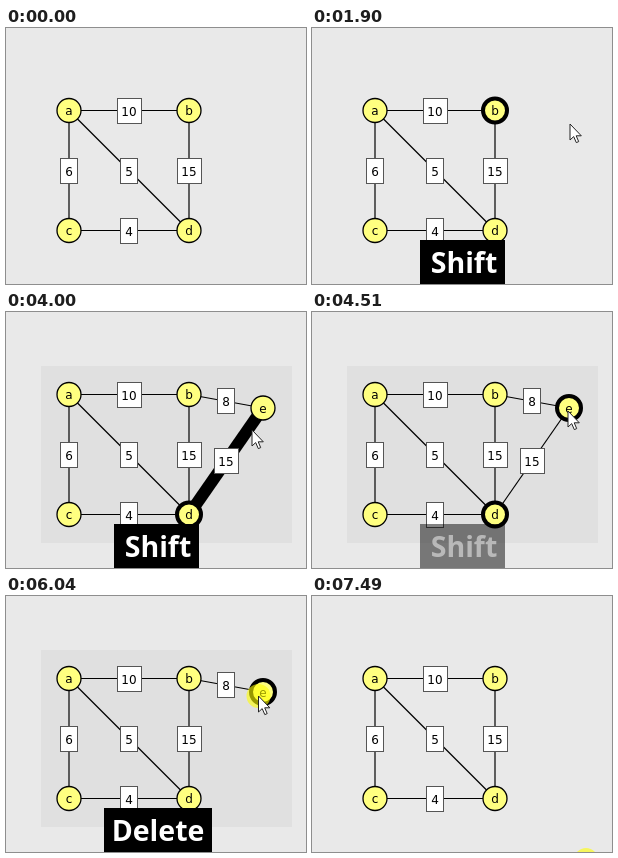
An HTML page with a canvas that plays this animation: 300 by 256 pixels, repeating every 7530 ms.

```html
<!DOCTYPE html>
<html lang="en">
<head>
<meta charset="utf-8">
<title>Graph editor</title>
<style>
  html, body { margin: 0; width: 100%; height: 100%; overflow: hidden; background: #e9e9e9; }
  canvas { display: block; }
</style>
</head>
<body>
<canvas id="stage" width="300" height="256"></canvas>
<script>
const ctx = document.getElementById('stage').getContext('2d');
const LOOP = 7530;

const nodes = { a: [63, 82.5], b: [183, 82.5], c: [63, 202.5], d: [183, 202.5], e: [257, 96] };
const edges = ['ab10', 'ac6', 'ad5', 'cd4', 'bd15', 'be8', 'de15'];

// Lifetimes, and the spans in which a part is highlighted, in ms
const alive = { e: [2040, 6370], be: [2040, 6370], de: [3300, 5390] };
const bold = {
  b: [[360, 2040]],
  d: [[2840, 4560]],
  e: [[2040, 3300], [4190, 4760], [5900, 6370]],
  de: [[3710, 4190], [4760, 5390]]
};

// Pointer stops: time, x, y
const path = [
  [40, 241, 201], [460, 187, 77], [1350, 187, 77], [1760, 258, 96],
  [2320, 258, 96], [2930, 187, 205], [3060, 184, 197], [3630, 184, 197],
  [4000, 246, 118], [4280, 256, 99], [4700, 256, 99], [5030, 240, 125],
  [5720, 240, 125], [6000, 252.5, 100], [7170, 252.5, 100], [7300, 266, 262]
];

// Clicks: start, end, and the place if it is not at the pointer
const clicks = [[690, 730], [1990, 2040], [5200, 5240], [6040, 6130], [7490, LOOP, 274, 264]];

// Key captions: text, start, end, left, width
const keys = [['Shift', 1680, 4460, 108, 85], ['Delete', 5340, 7170, 98, 108]];

const within = (t, [from, to]) => t >= from && t < to;
const exists = (id, t) => !alive[id] || within(t, alive[id]);
const isBold = (id, t) => (bold[id] || []).some(span => within(t, span));

function pointer(t) {
  const i = path.findIndex(p => p[0] > t);
  if (i < 1) return null;
  const [t0, x0, y0] = path[i - 1], [t1, x1, y1] = path[i];
  const u = (t - t0) / (t1 - t0), k = u * u * (3 - 2 * u);
  return [x0 + (x1 - x0) * k, y0 + (y1 - y0) * k];
}

function text(s, x, y, font, color) {
  ctx.font = font;
  ctx.fillStyle = color;
  ctx.textAlign = 'center';
  ctx.fillText(s, x, y);
}

const small = '12px "DejaVu Sans", sans-serif';

function drawEdge(edge, t) {
  const id = edge.slice(0, 2), weight = edge.slice(2);
  if (!exists(id, t)) return;
  const [x0, y0] = nodes[id[0]], [x1, y1] = nodes[id[1]];
  ctx.beginPath();
  ctx.moveTo(x0, y0);
  ctx.lineTo(x1, y1);
  ctx.strokeStyle = '#000';
  ctx.lineWidth = isBold(id, t) ? 12 : 1.2;
  ctx.stroke();

  const x = (x0 + x1) / 2, y = (y0 + y1) / 2, w = weight.length > 1 ? 24 : 17;
  const box = [Math.floor(x - w / 2) + 0.5, Math.floor(y - 12.5) + 0.5, w, 25];
  ctx.fillStyle = '#fff';
  ctx.fillRect(...box);
  ctx.strokeStyle = '#555';
  ctx.lineWidth = 1;
  ctx.strokeRect(...box);
  text(weight, x, Math.round(y + 5), small, '#000');
}

function drawNode(id, t) {
  if (!exists(id, t)) return;
  const [x, y] = nodes[id];
  disc(x, y, '#ffff80');
  ctx.strokeStyle = '#000';
  ctx.lineWidth = isBold(id, t) ? 4 : 1.3;
  ctx.stroke();
  text(id, x, Math.floor(y + 5), small, '#000');
}

function disc(x, y, color) {
  ctx.beginPath();
  ctx.arc(x, y, 12, 0, 7);
  ctx.fillStyle = color;
  ctx.fill();
}

function drawArrow(x, y) {
  ctx.save();
  ctx.translate(x, y);
  ctx.beginPath();
  for (const [px, py] of [[0, 0], [0, 16], [3.7, 12.6], [6.3, 18.6], [8.7, 17.6], [6.2, 11.8], [11.3, 11.8]])
    ctx.lineTo(px, py);
  ctx.closePath();
  ctx.fillStyle = '#fff';
  ctx.fill();
  ctx.strokeStyle = '#222';
  ctx.lineWidth = 1;
  ctx.stroke();
  ctx.restore();
}

function drawKey([label, from, to, x, w], t) {
  if (!within(t, [from, to + 100])) return;
  ctx.globalAlpha = Math.min(1, 1 - (t - to) / 100);
  ctx.fillStyle = '#000';
  ctx.fillRect(x, 212, w, 44);
  text(label, 152, 245, 'bold 28.5px "Open Sans", "Noto Sans", sans-serif', '#fff');
  ctx.globalAlpha = 1;
}

function draw(t) {
  ctx.fillStyle = '#e9e9e9';
  ctx.fillRect(0, 0, 300, 256);
  if (exists('e', t)) {
    ctx.fillStyle = '#e0e0e0';
    ctx.fillRect(35, 54, 251, 177);
  }
  edges.forEach(edge => drawEdge(edge, t));
  Object.keys(nodes).forEach(id => drawNode(id, t));

  const at = pointer(t);
  const click = clicks.find(c => within(t, c));
  if (click) {
    const [x, y] = at || click.slice(2);
    disc(x, y, 'rgba(255, 255, 0, 0.6)');
  }
  if (at) drawArrow(...at);
  keys.forEach(key => drawKey(key, t));
}

const start = performance.now();
function tick() {
  draw((performance.now() - start) % LOOP);
  requestAnimationFrame(tick);
}
tick();
</script>
</body>
</html>
```
